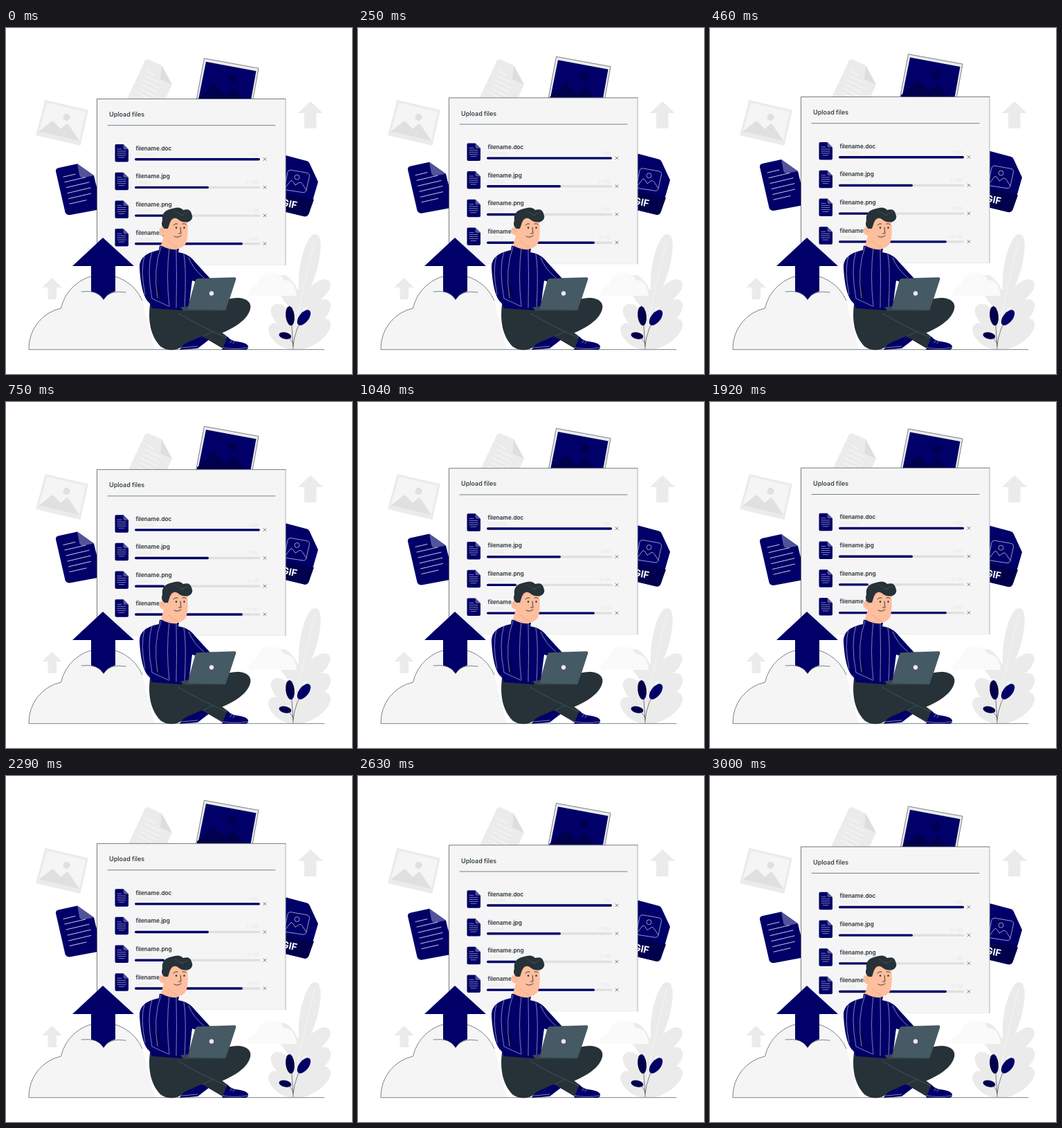
An HTML page that plays this animation: 500x500 px, repeating every 3.04 s.

```html
<!DOCTYPE html>
<html lang="en">
<head>
<meta charset="utf-8">
<style>
  html, body { margin: 0; width: 100%; height: 100%; overflow: hidden; background: #fff; }
  svg { display: block; width: 100vw; height: 100vh; }
  text { font-family: Inter, "Open Sans", sans-serif; fill: #263238; }
  .navy { fill: #000068; }
  .deep { fill: #00004c; }
  .ink { fill: #263238; }
  .pale { fill: #ebebeb; }
  .line { fill: none; stroke: #263238; stroke-width: .6; stroke-linecap: round; }
  .white { fill: none; stroke: #fff; stroke-linecap: round; }
  .name { font-size: 8.2px; font-weight: 600; }
  .faint { font-size: 6px; fill: #e6e6e6; }
</style>
</head>
<body>
<svg viewBox="0 0 500 500">
  <!-- pale scenery -->
  <g class="pale">
    <path d="M440 106L458 123H448.500V145H431V123H422Z"/>
    <path d="M66.500 361L81 375H73V392H60.500V375H52Z"/>
    <path d="M56.500 104L119 118.500L107.500 170L43 155Z"/>
    <path d="M201 47Q203 44.500 206 45.500L225 54L240 82L226 112H176L174 104Z"/>
  </g>
  <path fill="#f5f5f5" d="M59.500 108L115 121L106 163L47.500 149.500Z"/>
  <path fill="#e0e0e0" d="M47.500 149.500L66 135Q68 134 69.500 136L79 146L87 139Q89 138 90.500 140L106 163Z"/>
  <circle cx="87.500" cy="129" r="5" fill="#e0e0e0"/>
  <path fill="#dedede" d="M225 54L240 82L223 74Z"/>
  <path class="white" stroke-width=".8" d="M203 62l12 6M201 69l23 11M198 75l24 12M195 81l24 12M192 87l24 12M189 93l18 9"/>
  <g id="leaves" class="pale"></g>
  <path class="pale" d="M409 464L418 380L434 372L423 464Z"/>
  <path class="white" stroke-width=".5" d="M415 464C418 425 428 380 446 308"/>
  <path fill="#fafafa" d="M350 387Q351 374 362 372Q364 354 382 353Q397 353 402 365Q417 363 420 387Z"/>

  <!-- bobbing files -->
  <g id="files">
    <g>
      <path fill="#ebebeb" stroke="#263238" stroke-width=".6" d="M286.500 43.700L365 58L352 130L271 126Z"/>
      <path class="navy" d="M289 48.500L361.500 62L350 126L274 123Z"/>
      <path class="deep" d="M276 103L299 83.500Q301 82 303 84L317 98L327 88Q329 86 331 88.500L352 117H275Z"/>
      <circle class="deep" cx="327.500" cy="73.300" r="6"/>
    </g>
    <g>
      <path class="navy" d="M72 207Q71.500 203 75.500 202L103 196L127 213L138 258Q138 261 135 262L92 270Q87 270 85.500 266Z"/>
      <path fill="#53539a" d="M103 196L127 213L111 216Q107 216 106 212Z"/>
      <path class="white" stroke-width=".8" d="M83 215l17-4M85 222.500l30-7M87 230.500l33-7.800M89 238.500l33-7.800M90.500 246.500l32-7.500M92 254l24-5.500"/>
    </g>
    <g>
      <path class="navy" d="M396 183Q399 182 403 183.500L435 192Q438 193 439 196L451 222L438 267Q436 273 431 272L385 261Z"/>
      <path class="deep" d="M390 236L445 247.500L438 267Q436 273 431 272L385 261Z"/>
      <g fill="none" stroke="#fff" stroke-width=".6">
        <path d="M411 205L434 209Q439 210 438.500 214L434 234Q433 238 429 237.500L406 234Q402 233 403 228L407 208Q408 205 411 205Z"/>
        <path d="M404 230L411 221Q413 219 415 222L418 227L424 223Q426 222 428 225L434 234"/>
        <circle cx="420.500" cy="215.500" r="3.500"/>
      </g>
      <text transform="translate(397.500 256.300) rotate(12)" style="fill:#fff;font-size:14px;font-weight:700">GIF</text>
    </g>
  </g>

  <g id="panel">
    <rect x="131.500" y="102" width="272.500" height="240" fill="#f5f5f5" stroke="#e4e4e4" stroke-width=".6"/>
    <path class="line" d="M131.500 342V102H404"/>
    <path class="line" style="stroke:#8a9195" d="M404 102V342"/>
    <text x="149" y="127.700" font-size="9" font-weight="500">Upload files</text>
    <path class="line" d="M147 140.200H389"/>
  </g>

  <!-- cloud and arrow -->
  <path class="line" d="M33 464.700H460"/>
  <path fill="#f5f5f5" d="M33 464A59 59 0 0 1 79.500 405A62 62 0 0 1 197 394L215 464Z"/>
  <path class="line" d="M33 464A59 59 0 0 1 79.500 405A62 62 0 0 1 197 394"/>
  <path class="navy" d="M140 303L185 344H158V380.500Q147 383 141 392.500Q135 383 123 380.500V344H96Z"/>
  <path class="line" d="M109 381Q133 378 141 392.500Q149 378 173 382"/>

  <!-- small plant -->
  <path class="line" d="M415 464Q414 440 411 408M415 460Q417 434 433 412M415 457Q412 447 400 443"/>
  <ellipse class="deep" cx="410.500" cy="416" rx="6.300" ry="14" transform="rotate(-6 411 416)"/>
  <ellipse class="navy" cx="430.500" cy="418.500" rx="7" ry="13" transform="rotate(38 430.500 418.500)"/>
  <ellipse class="deep" cx="403.500" cy="444.500" rx="9" ry="4.800" transform="rotate(12 403 444)"/>

  <!-- seated man -->
  <path class="ink" d="M245 407L325 391C344 387 356 395 353 406C349 424 322 439 291 448L262 457Z"/>
  <path class="ink" d="M208 400C205 424 209 445 223 460C232 467 246 467 255 460L284 445L262 402Z"/>
  <path class="navy" d="M251 465Q254 457 268 452L284 445L294 450L277 463Z"/>
  <path class="ink" d="M262 402L321 447L313 463L284 446L244 424Z"/>
  <path fill="none" stroke="#56666f" stroke-width=".6" d="M249 412Q282 432 320 448M284 446L300 438"/>
  <path class="navy" d="M320 446Q325 452 334 453Q349 455 350 460Q350 465 346 465H312Z"/>
  <path class="white" stroke-width=".5" d="M313 462Q330 465 349 462M254 462L277 460M326 452l-2 3M330 453l-2 3"/>
  <path class="navy" id="sweater" d="M222 314.500L250 319L249 324C261 326 268 331 273 338L295 362L285 370L269 365L264 404L255 408L211 405L207 397C198 390 194 367 193 346C193 333 201 325 221 321Z"/>
  <path class="deep" d="M214 355L219 389L245 399L226 391Z"/>
  <clipPath id="body"><use href="#sweater"/></clipPath>
  <g clip-path="url(#body)" class="white" style="stroke:#d6d6ea" stroke-width=".6">
    <path d="M200 329Q194 352 201 385M211 323Q203 348 211 391L235 402M224 316Q212 350 219 390M236 317Q231 360 236 402M246 320Q247 360 246 404M257 327Q261 350 258 404M264 332Q270 348 286 361"/>
  </g>
  <path fill="#ffbe9d" d="M232 270L261 270C264 292 263 309 258 314C254 318 249 318 247 320Q235 321 224 314L228 300Q220 298 221.500 291Q223 286 229 289Z"/>
  <path fill="none" stroke="#e0937a" stroke-width=".6" d="M235 307Q240 314 248 317M224 291Q228 291 228 296"/>
  <path class="ink" d="M229 290Q223 286 226 278Q224 264 240 261Q251 257 256 263Q266 260 268 268Q272 276 264 280Q255 282 248 276Q241 272 237 281L234 290Z"/>
  <path class="line" style="stroke-width:.9" d="M242 285Q245 281.500 248 283M255 283Q258 281.500 260 284M252 288L253 297L249.500 297M243 301Q248 304 253 300"/>
  <path class="line" style="stroke:#53626a;stroke-width:.5" d="M253 270Q260 269 263 266M244 264Q249 269 256 271"/>
  <ellipse class="ink" cx="246" cy="288.500" rx="1.100" ry="1.600"/>
  <ellipse class="ink" cx="257.500" cy="288.500" rx="1.100" ry="1.600"/>
  <path fill="#37474f" d="M252 403.500L264 402L317 406.500L316 408.500H256Z"/>
  <path fill="#455a64" stroke="#263238" stroke-width=".3" d="M277 362L330 360.500Q333 360.500 332 363.500L317.500 408L262 407L274 364Q275 362 277 362Z"/>
  <circle cx="297" cy="383.500" r="3.200" fill="#f3e6ea"/>
</svg>
<script>
  const PERIOD = 3040;
  const $ = id => document.getElementById(id);
  const panel = $('panel'), files = $('files');

  // base x, base y, tip x, tip y, half width
  const leaves = [
    [427, 392, 448, 298, 17], [424, 410, 396, 358, 17], [422, 405, 467, 366, 16],
    [420, 440, 386, 401, 17], [417, 440, 467, 395, 19], [415, 464, 382, 429, 16],
    [416, 464, 467, 423, 19]
  ];
  $('leaves').innerHTML = leaves.map(([x, y, tx, ty, w]) => {
    const len = Math.hypot(tx - x, ty - y);
    const turn = Math.atan2(ty - y, tx - x) * 180 / Math.PI;
    return `<path transform="translate(${x} ${y}) rotate(${turn})"
      d="M0 0C${len * .2} ${-w} ${len} ${-w} ${len} 0C${len} ${w} ${len * .2} ${w} 0 0Z"/>`;
  }).join('');

  const rows = [
    ['doc', 367, 'Complete', '5 MB'], ['jpg', 293, 'Loading...', '25 MB'],
    ['png', 229, 'Loading...', '12 MB'], ['gif', 342, 'Loading...', '15 MB']
  ];
  panel.innerHTML += rows.map(([ext, end, state, size], i) => `
    <g transform="translate(0 ${i * 40.7})">
      <path class="navy" d="M159 167.500H169.500L177 175V191Q177 193 175 193H159.500Q157.500 193 157.500 191V169.500Q157.500 167.500 159 167.500Z"/>
      <path fill="#53539a" d="M169.500 167.500L177 175H171.500Q169.500 175 169.500 173Z"/>
      <path class="white" stroke-width=".5" d="M161 174.500h6M161 177.500h12M161 180.500h12M161 183.500h12M163 186.500h8"/>
      <text class="name" x="187.500" y="176">filename.${ext}</text>
      <text class="faint" x="187.500" y="184">${state}</text>
      <text class="faint" x="365" y="184" text-anchor="end">${size}</text>
      <rect x="186" y="187.500" width="181.500" height="3.400" rx="1.700" fill="#e0e0e0"/>
      <rect class="navy" x="186" y="187.500" width="${end - 186}" height="3.400" rx="1.700"/>
      <path class="line" d="M372 187l4 4M376 187l-4 4"/>
    </g>`).join('');

  function draw() {
    const t = performance.now() % PERIOD;
    const rise = 1 - Math.abs(1 - 2 * t / PERIOD);
    const bob = Math.sin(2 * Math.PI * (t + 20) / PERIOD) ** 2;
    panel.setAttribute('transform', `translate(0 ${.5 - 9.8 * rise})`);
    files.setAttribute('transform', `translate(0 ${.2 - 8.7 * bob})`);
    requestAnimationFrame(draw);
  }
  draw();
</script>
</body>
</html>
```
